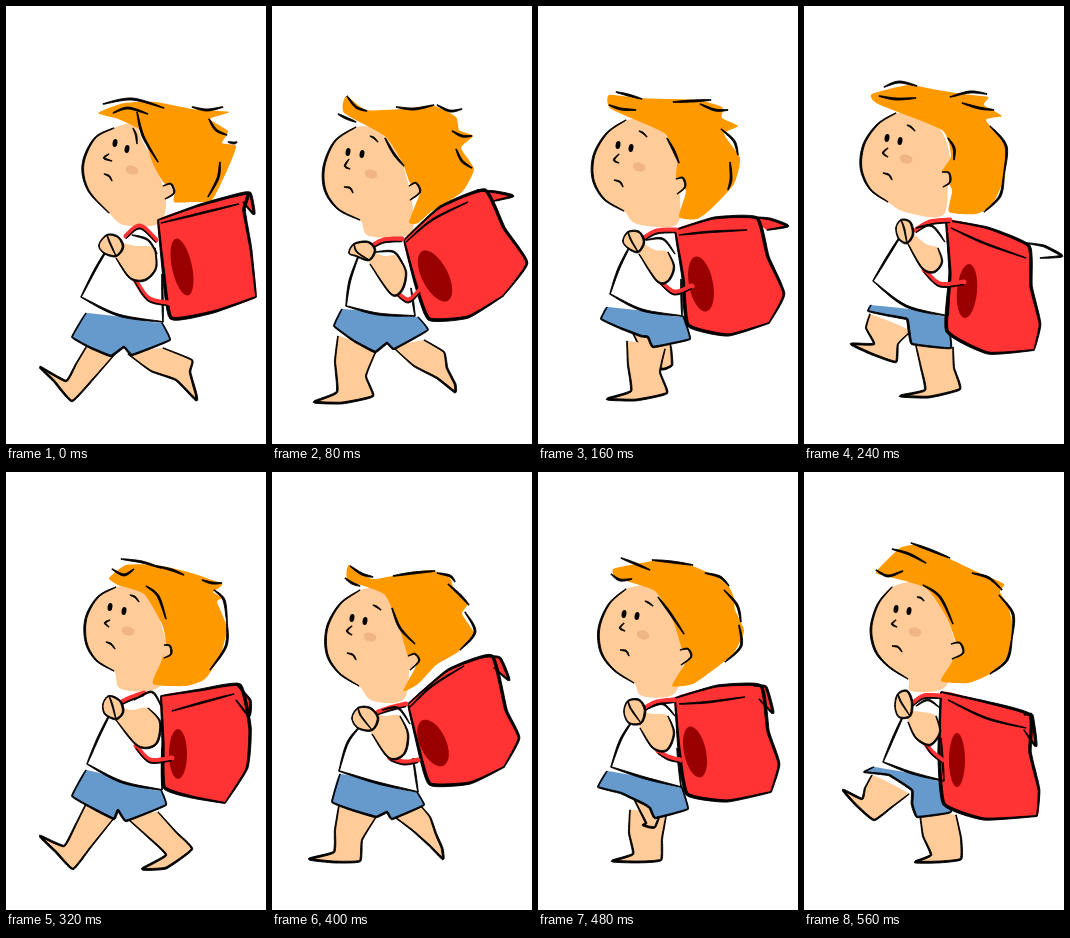
Write an HTML page that moves like this. It is 260 px wide and 438 px high and loops after 640 ms.

```html
<!DOCTYPE html>
<html lang="en">
<head>
<meta charset="utf-8">
<title>Walking to school</title>
<style>
html, body { margin: 0; width: 100%; height: 100%; overflow: hidden; background: #fff; }
svg { display: block; width: 100%; height: 100%; }
</style>
</head>
<body>
<svg id="stage" viewBox="0 0 260 438"></svg>
<script>
const STEP = 80;
const SKIN = '#ffcc99', HAIR = '#ff9900', RED = '#ff3333', BLUE = '#6699cc', DARK = '#990000', INK = '#000';

// Key drawings. Matching parts have matching points, so two drawings can be blended.
const strideA = {
  face: '108,122 90,131 79,150 77,168 84,187 103,207 118,219 152,218 160,195 150,160 138,138 128,118',
  hair: '92,107 118,97 150,96 186,103 223,106 204,113 222,125 216,137 230,140 223,160 206,194 186,196 168,196 169,181 158,177 147,158 135,125 112,113',
  locks: '97,98 126,93 158,102/107,107 122,102 142,108/186,101 201,104 217,101/203,113 210,124 221,129/222,136 228,137 231,136/214,156 212,172 202,191/131,106 137,130 152,156',
  marks: '127,122 130,129 131,138/103,148 98,152 106,155/98,168 103,170 106,175',
  ear: '157,180 165,178 168,187 159,193',
  eyes: '109,137 121,143 126,164',
  shirt: '108,232 90,262 75,291 112,309 157,316 156,268 152,224 128,219',
  shorts: '80,307 66,331 85,342 105,350 118,341 126,349 164,334 156,317',
  legA: '82,338 70,358 60,375 34,361 48,375 66,395 88,372 109,348',
  legB: '122,348 145,365 170,374 190,394 190,388 184,366 186,354 157,342',
  arm: '114,238 130,240 149,242 150,262 139,274 124,272 110,252',
  hand: '93,239 101,229 112,231 117,241 110,250 98,247',
  sleeve: '126,229 142,234 151,248',
  strap: '120,230 134,220 150,234/128,272 142,292 162,297',
  bag: '152,214 157,262 165,312 207,306 250,291 245,244 238,204 241,187 194,199',
  tab: '230,190 244,187 248,208 237,196',
  fold: '155,217 196,207 233,198',
  patch: '176,261 10,29 -12,0'
};
const landA = {
  face: '84,121 63,135 52,160 53,184 66,203 88,214 97,230 138,228 140,195 134,170 126,145 108,124',
  hair: '74,90 94,104 130,103 162,100 184,111 187,124 201,130 189,142 202,163 190,186 160,205 146,217 137,216 148,186 138,177 130,156 113,130 72,107',
  locks: '75,90 84,101 95,105/66,108 74,112 84,116/124,101 142,103 162,99/165,99 178,105 190,103/180,125 190,130 200,130/184,143 190,155 200,162/113,132 122,148 132,160',
  marks: '98,130 102,132 106,136/77,153 73,160 78,163/72,181 78,182 81,187',
  ear: '137,180 144,177 148,186 138,194',
  eyes: '76,146 90,148 99,168',
  shirt: '88,246 78,274 74,300 106,308 143,310 139,282 134,236 110,231',
  shorts: '70,303 62,320 82,335 103,346 115,337 122,343 156,324 146,311',
  legA: '66,330 63,355 65,386 42,396 70,397 101,390 94,370 104,345',
  legB: '122,342 142,360 165,372 183,386 183,378 175,362 172,346 152,334',
  arm: '98,246 112,250 126,250 134,266 130,284 119,288 98,258',
  hand: '77,247 82,238 96,236 103,244 97,254 84,250',
  sleeve: '104,246 122,246 132,260',
  strap: '100,240 112,234 130,233/122,284 136,294 148,284',
  bag: '132,234 143,276 157,313 196,311 231,290 255,257 232,222 213,184 168,201',
  tab: '205,184 224,186 241,190 222,195',
  fold: '134,236 160,214 196,196',
  patch: '163,270 13,28 -27,0'
};
const passA = {
  face: '92,107 74,118 60,138 57,162 66,183 84,196 101,206 138,210 144,180 146,152 138,126 118,108',
  hair: '68,88 104,79 128,83 158,88 184,91 180,99 198,110 182,114 201,140 201,170 188,199 172,208 145,206 148,184 138,166 147,150 138,124 74,98',
  locks: '80,81 95,76 113,80/75,90 92,93 112,92/146,91 166,86 183,88/158,97 175,102 190,104/186,120 202,140 200,168/200,168 196,190 180,206/144,132 150,142 150,154',
  marks: '103,119 107,121 111,125/84,142 79,147 84,151/79,167 85,169 88,174',
  ear: '138,166 145,167 146,176 139,181',
  eyes: '83,132 96,135 102,153',
  shirt: '99,226 84,250 69,275 102,300 144,310 146,264 146,216 118,212',
  shorts: '67,299 64,305 82,309 103,313 105,325 108,338 147,342 143,308',
  legA: '112,340 117,362 121,384 96,390 125,391 156,383 150,362 149,341',
  legB: '66,308 62,322 70,338 47,338 68,348 92,356 94,338 107,325',
  arm: '108,228 122,238 134,242 138,256 130,266 118,262 104,238',
  hand: '92,222 97,214 106,216 109,228 103,237 95,233',
  sleeve: '112,222 128,220 141,236',
  strap: '112,224 126,216 146,214/120,264 136,278 160,276',
  bag: '142,214 146,268 143,325 184,347 230,344 236,318 227,280 225,240 184,222',
  tab: '222,237 240,240 258,250 236,252',
  fold: '147,222 180,237 222,252',
  patch: '163,285 10,27 5,0',
  tail: '#fff'
};
const strideB = {
  face: '110,115 92,125 80,146 80,170 90,188 108,199 115,217 152,216 162,185 156,155 148,132 130,116',
  hair: '103,106 120,93 150,93 182,100 216,112 207,120 217,126 211,130 221,156 214,184 199,207 180,214 147,212 155,190 160,172 156,152 138,122 112,113',
  locks: '115,87 136,90 155,96/106,97 118,103 128,97/150,94 166,98 178,103/196,108 206,111 216,111/208,118 218,128 221,150/221,150 220,174 204,198/140,114 152,124 160,147',
  marks: '124,123 129,125 133,130/104,148 99,151 103,155/100,170 105,172 109,177',
  ear: '158,173 164,174 165,182 158,186',
  eyes: '104,135 118,139 122,159',
  shirt: '108,234 93,264 81,292 116,310 156,318 156,276 154,226 130,219',
  shorts: '80,298 66,324 88,337 108,347 112,338 120,349 160,333 155,318',
  legA: '122,347 142,365 160,383 136,397 160,396 186,377 170,360 152,340',
  legB: '82,328 70,352 58,374 34,364 50,380 67,397 84,376 108,346',
  arm: '114,236 126,238 142,236 154,250 150,272 132,274 110,248',
  hand: '97,232 103,224 114,229 117,240 110,247 99,242',
  sleeve: '128,228 146,220 156,236',
  strap: '112,232 124,226 138,221/130,274 144,288 166,286',
  bag: '155,224 157,270 158,315 186,325 219,331 241,296 244,256 234,213 194,218',
  tab: '230,212 244,228 243,244 230,228',
  fold: '166,239 198,230 228,222',
  patch: '172,282 9,25 0,0'
};
const landB = {
  face: '88,118 68,132 55,156 55,182 67,201 87,214 101,229 132,227 137,190 132,163 122,138 108,118',
  hair: '77,93 100,107 130,102 158,98 178,106 182,118 196,131 190,142 202,162 186,180 164,193 146,212 131,219 145,192 136,184 126,152 112,122 76,108',
  locks: '78,94 90,102 101,105/73,106 80,111 88,114/121,104 141,101 163,99/165,101 178,104 183,110/176,112 188,123 197,133/193,140 203,160 188,178/120,136 128,156 143,172',
  marks: '101,133 105,135 109,138/80,154 75,159 80,163/75,181 81,183 84,188',
  ear: '136,184 143,182 147,189 138,198',
  eyes: '80,146 93,149 98,165',
  shirt: '92,250 76,270 67,299 106,311 146,320 141,286 136,234 112,230',
  shorts: '68,302 60,330 80,338 104,345 115,340 120,347 152,333 143,317',
  legA: '120,343 140,358 158,374 171,387 170,376 164,362 158,345 148,333',
  legB: '67,333 63,358 62,380 37,387 62,390 88,389 90,368 104,345',
  arm: '102,244 114,244 128,244 136,262 132,282 117,286 100,262',
  hand: '80,246 86,236 98,236 106,246 100,258 86,256',
  sleeve: '110,238 126,236 138,252',
  strap: '106,240 118,236 134,232/118,286 132,290 146,288',
  bag: '136,232 146,274 158,312 198,311 232,295 247,266 234,238 220,184 176,198',
  tab: '212,184 228,186 237,208 222,196',
  fold: '137,236 160,214 192,194',
  patch: '161,271 13,25 -25,0'
};
const passB = {
  face: '88,115 74,132 67,156 71,178 84,194 104,207 107,219 140,216 152,185 148,160 138,134 116,111',
  hair: '72,100 96,76 116,73 146,87 180,103 200,112 196,120 204,134 209,156 204,184 186,202 164,211 137,209 148,190 152,172 143,146 122,116 82,104',
  locks: '88,77 105,82 122,91/72,98 84,104 99,99/107,71 126,78 146,86/168,101 185,106 198,118/195,123 209,142 208,166/208,166 203,188 186,202/119,113 136,125 149,152',
  marks: '113,125 117,126 120,129/92,148 88,152 93,155/88,174 94,175 98,180',
  ear: '147,172 156,171 159,181 148,187',
  eyes: '92,137 105,139 111,160',
  shirt: '101,240 90,264 79,290 108,301 140,309 137,266 138,222 118,218',
  shorts: '70,295 60,300 85,303 108,318 108,332 113,345 147,340 143,308',
  legA: '68,303 61,316 58,327 39,318 52,333 70,348 88,335 105,322',
  legB: '116,342 119,364 127,383 111,390 135,390 157,387 157,366 152,343',
  arm: '106,240 118,240 132,244 136,260 126,273 112,266 104,250',
  hand: '91,234 94,222 103,219 108,230 106,244 95,245',
  sleeve: '112,234 124,228 136,236',
  strap: '108,232 120,224 138,224/122,272 128,280 138,288',
  bag: '137,220 135,280 140,332 180,347 233,344 235,318 226,280 226,243 182,230',
  tab: '220,243 228,243 232,274 220,258',
  fold: '144,228 182,246 222,256',
  patch: '153,288 8,27 0,0'
};

const points = s => s.split(' ').map(p => p.split(',').map(Number));

function blend(a, b, k = 0.5) {
  const out = {};
  for (const key in a) {
    const to = b[key] && b[key].match(/-?\d+/g);
    let i = 0;
    out[key] = to ? a[key].replace(/-?\d+/g, n => Math.round(+n + (to[i++] - n) * k)) : a[key];
  }
  return out;
}

// Samples a cardinal spline; a smaller pull gives sharper corners.
function curve(pts, pull, closed) {
  const n = pts.length, out = [];
  const at = i => closed ? pts[(i + n) % n] : pts[Math.max(0, Math.min(n - 1, i))];
  for (let i = 0; i < (closed ? n : n - 1); i++) {
    const [a, b, c, d] = [at(i - 1), at(i), at(i + 1), at(i + 2)];
    for (let s = 0; s < 8; s++) {
      const t = s / 8, u = 1 - t;
      out.push([0, 1].map(j =>
        u * u * u * b[j] + 3 * u * u * t * (b[j] + (c[j] - a[j]) * pull) +
        3 * u * t * t * (c[j] - (d[j] - b[j]) * pull) + t * t * t * c[j]));
    }
  }
  out.push(closed ? pts[0] : pts[n - 1]);
  return out;
}

const trace = pts => 'M' + pts.map(p => p.map(v => v.toFixed(1)).join(' ')).join('L');
const fill = (pts, color, pull = 0.16) => `<path d="${trace(curve(pts, pull, true))}Z" fill="${color}"/>`;
const line = (pts, color, w) =>
  `<path d="${trace(curve(pts, 0.16))}" fill="none" stroke="${color}" stroke-width="${w}" stroke-linecap="round"/>`;
const oval = (x, y, rx, ry, color, turn = 0) =>
  `<ellipse cx="${x}" cy="${y}" rx="${rx}" ry="${ry}" fill="${color}" transform="rotate(${turn} ${x} ${y})"/>`;

// Brush line: thick in the middle, thin at both ends.
function brush(pts, w = 2.4, pull = 0.16, closed = false) {
  const c = curve(pts, pull, closed), last = c.length - 1, left = [], right = [];
  c.forEach(([x, y], i) => {
    const p = c[Math.max(0, i - 1)], q = c[Math.min(last, i + 1)];
    const dx = q[0] - p[0], dy = q[1] - p[1], len = Math.hypot(dx, dy) || 1;
    const r = (w - 0.8) / 2 * (0.3 + 0.7 * Math.sin(Math.PI * i / last));
    left.push([x - dy / len * r, y + dx / len * r]);
    right.unshift([x + dy / len * r, y - dx / len * r]);
  });
  return `<path d="${trace(left.concat(right))}Z" fill="${INK}" stroke="${INK}" stroke-width=".9" stroke-linejoin="round"/>`;
}

function draw(pose) {
  const get = key => points(pose[key]);
  const many = key => pose[key].split('/').map(points);
  const { face, hair, ear, eyes, shirt, shorts, arm, hand, bag, tab, patch } =
    Object.fromEntries(['face', 'hair', 'ear', 'eyes', 'shirt', 'shorts', 'arm', 'hand', 'bag', 'tab', 'patch']
      .map(key => [key, get(key)]));
  const [pos, size, turn] = patch;
  const legs = ['legB', 'legA'].map(get);

  return [
    ...legs.map(leg => fill(leg, SKIN, 0.07) + brush(leg, 2.7, 0.07)),
    fill(shorts, BLUE, 0.04), brush(shorts, 2.6, 0.04),
    fill(shirt, '#fff', 0.08),
    fill(face, SKIN),
    fill(hair, HAIR, 0.09),
    fill(ear, SKIN), brush(ear, 2.2),
    brush(face.slice(0, 6), 2.6),
    ...many('locks').map(p => brush(p, 2.8)),
    ...many('marks').map(p => brush(p, 2.2)),
    oval(...eyes[0], 2.4, 4, INK, 10), oval(...eyes[1], 2.4, 4, INK, 10),
    oval(...eyes[2], 6.5, 4.5, '#f0b584', 15),
    fill(bag, RED, 0.06), fill(tab, pose.tail || RED, 0.08),
    oval(...pos, ...size, DARK, turn[0]),
    brush(bag.slice(0, 5), 3.6, 0.08), brush(bag.slice(4).concat([bag[0]]), 3.4, 0.08),
    brush(tab, 3, 0.08), brush(get('fold'), 2.4),
    brush(shirt.slice(0, 3), 2.6), brush(shirt.slice(2, 5), 2.8), brush(shirt.slice(4, 6), 2.2),
    ...many('strap').map(p => line(p, RED, 5) + brush(p.map(([x, y]) => [x, y + 2.5]), 1.8)),
    fill(arm, SKIN), brush(get('sleeve'), 2.4), brush(arm.slice(2), 2.5),
    fill(hand, SKIN), brush(hand, 2.5, 0.16, true),
    brush([hand[1], [hand[1][0] + 3, hand[1][1] + 8], hand[4]], 2)
  ].join('');
}

const cycle = [strideA, landA, blend(landA, passA), passA, strideB, landB, blend(landB, passB), passB];
const stage = document.getElementById('stage');
stage.innerHTML = cycle.map(pose => `<g display="none">${draw(pose)}</g>`).join('');
const groups = [...stage.children];
const start = performance.now();

function update() {
  const now = Math.floor((performance.now() - start) / STEP) % cycle.length;
  groups.forEach((g, i) => g.setAttribute('display', i === now ? 'inline' : 'none'));
  requestAnimationFrame(update);
}
update();
</script>
</body>
</html>
```
